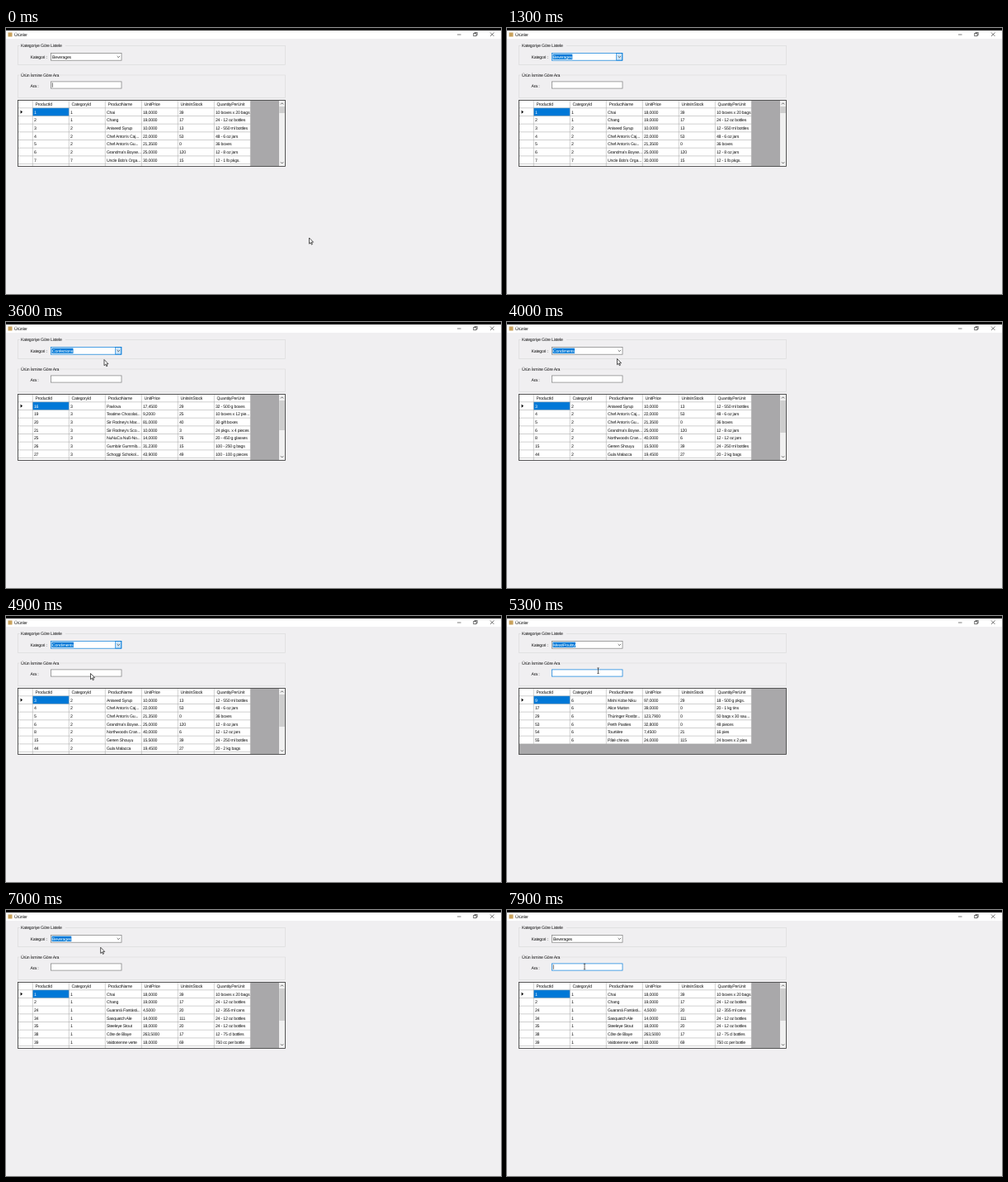
Animation of 600 by 322 pixels, one loop 8 s. Source, as an HTML page with a canvas:

```html
<!DOCTYPE html>
<html lang="tr">
<head>
<meta charset="utf-8">
<title>Ürünler</title>
<style>
html, body { margin: 0; width: 100%; height: 100%; overflow: hidden; background: #f0eff1; }
canvas { display: block; }
</style>
</head>
<body>
<canvas id="stage" width="600" height="322"></canvas>
<script>
const ctx = document.getElementById('stage').getContext('2d');
const LOOP = 8000, STEP = 100;
const BLUE = '#0078d7', EDGE = '#7a7a7a', LINE = '#a0a0a0';
const HEADERS = ['ProductId', 'CategoryId', 'ProductName', 'UnitPrice', 'UnitsInStock', 'QuantityPerUnit'];
const ROW = 9.68, COL = 44, GRID = { x: 14.5, y: 87.5, w: 324, h: 80 };

const parse = text => text.trim().split('\n').map(row => row.split('|'));

const all = parse(`
1|1|Chai|18,0000|39|10 boxes x 20 bags
2|1|Chang|19,0000|17|24 - 12 oz bottles
3|2|Aniseed Syrup|10,0000|13|12 - 550 ml bottles
4|2|Chef Anton's Caj...|22,0000|53|48 - 6 oz jars
5|2|Chef Anton's Gu...|21,3500|0|36 boxes
6|2|Grandma's Boyse...|25,0000|120|12 - 8 oz jars
7|7|Uncle Bob's Orga...|30,0000|15|12 - 1 lb pkgs.`);

const confections = parse(`
16|3|Pavlova|17,4500|29|32 - 500 g boxes
19|3|Teatime Chocolat...|9,2000|25|10 boxes x 12 pie...
20|3|Sir Rodney's Mar...|81,0000|40|30 gift boxes
21|3|Sir Rodney's Sco...|10,0000|3|24 pkgs. x 4 pieces
25|3|NuNuCa Nuß-No...|14,0000|76|20 - 450 g glasses
26|3|Gumbär Gummib...|31,2300|15|100 - 250 g bags
27|3|Schoggi Schokol...|43,9000|49|100 - 100 g pieces`);

const condiments = parse(`
3|2|Aniseed Syrup|10,0000|13|12 - 550 ml bottles
4|2|Chef Anton's Caj...|22,0000|53|48 - 6 oz jars
5|2|Chef Anton's Gu...|21,3500|0|36 boxes
6|2|Grandma's Boyse...|25,0000|120|12 - 8 oz jars
8|2|Northwoods Cran...|40,0000|6|12 - 12 oz jars
15|2|Genen Shouyu|15,5000|39|24 - 250 ml bottles
44|2|Gula Malacca|19,4500|27|20 - 2 kg bags`);

const meat = parse(`
9|6|Mishi Kobe Niku|97,0000|29|18 - 500 g pkgs.
17|6|Alice Mutton|39,0000|0|20 - 1 kg tins
29|6|Thüringer Rostbr...|123,7900|0|50 bags x 30 sau...
53|6|Perth Pasties|32,8000|0|48 pieces
54|6|Tourtière|7,4500|21|16 pies
55|6|Pâté chinois|24,0000|115|24 boxes x 2 pies`);

const beverages = parse(`
1|1|Chai|18,0000|39|10 boxes x 20 bags
2|1|Chang|19,0000|17|24 - 12 oz bottles
24|1|Guaraná Fantásti...|4,5000|20|12 - 355 ml cans
34|1|Sasquatch Ale|14,0000|111|24 - 12 oz bottles
35|1|Steeleye Stout|18,0000|20|24 - 12 oz bottles
38|1|Côte de Blaye|263,5000|17|12 - 75 cl bottles
39|1|Valdorienne verte|18,0000|69|750 cc per bottle`);

// thumb is the scrollbar thumb height, 0 when everything fits
const views = [
  { from: 0, name: 'Beverages', rows: all, thumb: 8 },
  { from: 1900, name: 'Confections', rows: confections, thumb: 36 },
  { from: 3800, name: 'Condiments', rows: condiments, thumb: 39 },
  { from: 5100, name: 'Meat/Poultry', rows: meat, thumb: 0 },
  { from: 6900, name: 'Beverages', rows: beverages, thumb: 39 }
];
const openSpans = [[700, 1900], [2700, 3800], [4500, 5100], [6500, 6900]];
const COMBO_FOCUS = 700, SEARCH_FOCUS = 7700;

const path = [
  [0, 367.5, 254], [400, 136, 34], [900, 136, 34], [1200, 122, 45], [1700, 115, 53],
  [1900, 115, 54], [2500, 139.5, 35], [2600, 137, 35], [3000, 137, 35], [3600, 119, 45.5],
  [3800, 117, 49], [4200, 150, 40], [4500, 137, 35], [4700, 137, 35], [4900, 102.5, 69.5],
  [5100, 101, 75], [5600, 128, 50], [6100, 137, 37], [6500, 137, 36], [6900, 115, 44],
  [7400, 112, 56], [7700, 94, 68.5], [8000, 94, 68.5]
];

function pointerAt(t) {
  const i = path.findIndex(p => p[0] > t);
  const [t0, x0, y0] = path[i - 1], [t1, x1, y1] = path[i];
  const k = (t - t0) / (t1 - t0), e = k * k * (3 - 2 * k);
  return { x: x0 + (x1 - x0) * e, y: y0 + (y1 - y0) * e };
}

function fill(x, y, w, h, color) {
  ctx.fillStyle = color;
  ctx.fillRect(x, y, w, h);
}

function frame(x, y, w, h, color, width = 0.7) {
  ctx.strokeStyle = color;
  ctx.lineWidth = width;
  ctx.strokeRect(x, y, w, h);
}

function line(points, color, width = 0.6) {
  ctx.strokeStyle = color;
  ctx.lineWidth = width;
  ctx.beginPath();
  points.forEach(([x, y]) => ctx.lineTo(x, y));
  ctx.stroke();
}

function text(str, x, y, color = '#111') {
  ctx.fillStyle = color;
  ctx.fillText(str, x, y);
}

function chevron(x, y, dir, size = 1.6) {
  line([[x - size, y - dir * size / 2], [x, y + dir * size / 2], [x + size, y - dir * size / 2]], '#444', 0.8);
}

function drawWindow() {
  fill(0, 0, 600, 322, '#f0eff1');
  fill(0, 0, 600, 3, '#000');
  fill(0, 3, 600, 10, '#fff');
  fill(2.5, 5.5, 5, 5, '#c9a25c');
  text('Ürünler', 10, 9.8);
  line([[547, 8], [551.5, 8]], '#222');
  frame(566.8, 6.6, 3.2, 3.2, '#222', 0.6);
  line([[568, 6.6], [568, 5.4], [571.2, 5.4], [571.2, 8.6], [570, 8.6]], '#222');
  line([[587, 5.5], [591.5, 10]], '#222');
  line([[591.5, 5.5], [587, 10]], '#222');
}

function drawGroup(label, y, h, width) {
  frame(14.5, y, 324, h, '#dcdcdc');
  fill(17, y - 2, width, 4, '#f0eff1');
  text(label, 18, y + 1.6);
}

function drawCombo(name, focused, open, hot) {
  text('Kategori :', 29.5, 36.6);
  fill(54, 30, 86, 9.5, '#fff');
  if (open) {
    fill(132.5, 30, 7.5, 9.5, '#cce4f7');
    frame(132.7, 30.4, 7, 8.7, BLUE, 0.6);
  }
  frame(54.5, 30.5, 85.5, 8.7, open || hot ? BLUE : EDGE);
  if (focused) fill(55.5, 31.7, ctx.measureText(name).width + 0.8, 6.3, BLUE);
  text(name, 56, 36.6, focused ? '#fff' : '#111');
  chevron(136.3, 34.9, 1);
}

function drawSearch(focused, hot) {
  text('Ara :', 29.5, 72.4);
  fill(54, 64.5, 86, 9, '#fff');
  frame(54.5, 64.9, 85.5, 8.2, hot ? BLUE : EDGE);
  if (focused) line([[56.3, 66.3], [56.3, 71.8]], '#000', 0.6);
}

function drawScrollbar(thumb) {
  fill(331, 88, 7.2, 79.2, '#f0f0f0');
  fill(331.3, 95, 6.6, thumb, '#cdcdcd');
  chevron(334.6, 91.6, -1);
  chevron(334.6, 163.2, 1);
}

function drawGrid({ rows, thumb }) {
  const { x, y, w, h } = GRID, top = 96.8, left = 32.3;
  ctx.save();
  ctx.beginPath();
  ctx.rect(x, y, w, h);
  ctx.clip();
  fill(x, y, w, h, '#a9a8aa');
  const count = thumb ? rows.length + 1 : rows.length;
  const right = left + COL * HEADERS.length, bottom = top + ROW * count;
  fill(x, y, right - x, bottom - y, '#fff');
  fill(left, top, COL, ROW, BLUE);
  for (let i = 0; i <= count; i++) line([[x, top + i * ROW], [right, top + i * ROW]], LINE, 0.5);
  for (let i = 0; i <= HEADERS.length; i++) line([[left + i * COL, y], [left + i * COL, bottom]], LINE, 0.5);
  HEADERS.forEach((label, c) => text(label, left + 3.2 + c * COL, 94.2));
  rows.forEach((row, r) => row.forEach((cell, c) =>
    text(cell, left + 1.6 + c * COL, top + r * ROW + 6.7, r + c ? '#111' : '#fff')));
  ctx.fillStyle = '#000';
  ctx.beginPath();
  ctx.moveTo(17.6, 99.6);
  ctx.lineTo(20, 101.7);
  ctx.lineTo(17.6, 103.8);
  ctx.fill();
  if (thumb) drawScrollbar(thumb);
  ctx.restore();
  frame(x, y, w, h, '#333', 0.8);
}

function drawArrow({ x, y }) {
  const shape = [[0, 0], [0, 7.2], [1.7, 5.7], [2.8, 8.2], [3.9, 7.7], [2.8, 5.3], [5, 5.2]];
  ctx.beginPath();
  shape.forEach(([dx, dy]) => ctx.lineTo(x + dx, y + dy));
  ctx.closePath();
  ctx.fillStyle = '#fff';
  ctx.fill();
  ctx.strokeStyle = '#111';
  ctx.lineWidth = 0.7;
  ctx.stroke();
}

function drawIBeam({ x, y }) {
  line([[x, y - 3.3], [x, y + 3.3]], '#222', 0.7);
  for (const dy of [-3.3, 3.3]) line([[x - 1.2, y + dy], [x + 1.2, y + dy]], '#222', 0.6);
}

function draw(t) {
  const view = views.findLast(v => v.from <= t);
  const pointer = pointerAt(t);
  const open = openSpans.some(([a, b]) => t >= a && t < b);
  const over = (top, bottom) => pointer.x > 54 && pointer.x < 141 && pointer.y > top && pointer.y < bottom;
  const comboFocused = t >= COMBO_FOCUS && t < SEARCH_FOCUS;
  const overSearch = !open && over(64.5, 73.5);

  ctx.font = '5.2px "Liberation Sans", Arial, sans-serif';
  ctx.letterSpacing = '-0.2px';
  ctx.textRendering = 'geometricPrecision';
  drawWindow();
  drawGroup('Kategoriye Göre Listele', 21.5, 23, 55);
  drawGroup('Ürün İsmine Göre Ara', 57, 27.5, 47);
  drawCombo(view.name, comboFocused, open, over(30, 39.5));
  drawSearch(!comboFocused, overSearch);
  drawGrid(view);
  if (overSearch) drawIBeam(pointer);
  else if (t < 1200 || t >= 1500) drawArrow(pointer);
}

function tick() {
  draw(Math.floor(performance.now() % LOOP / STEP) * STEP);
  requestAnimationFrame(tick);
}
tick();
</script>
</body>
</html>
```
